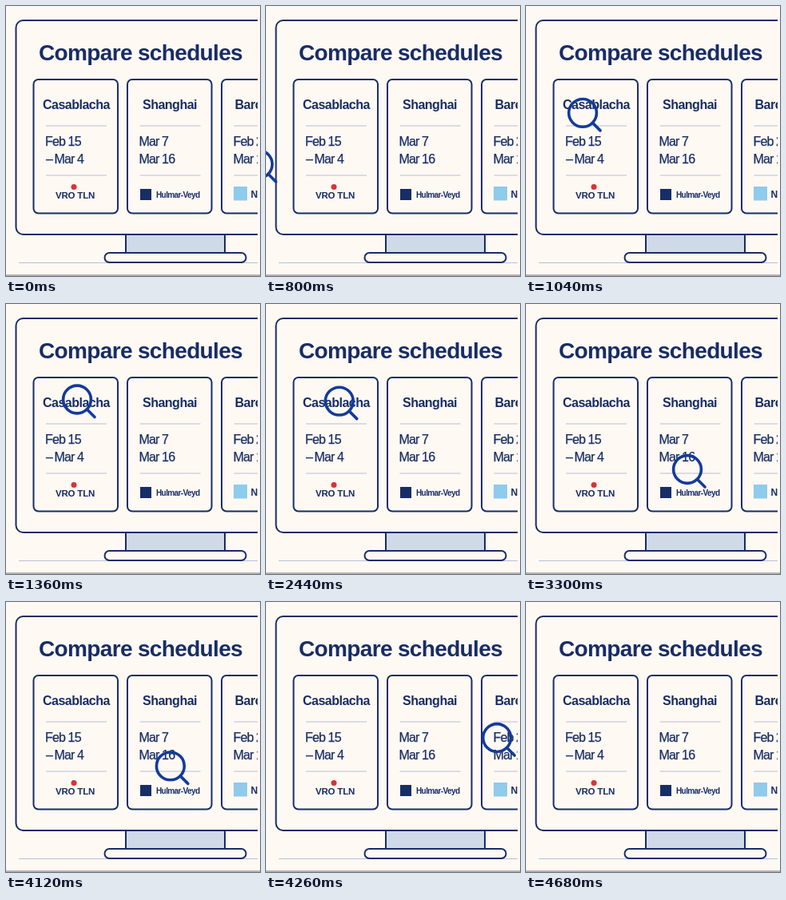
Recreate the animation shown at these times as an HTML page. Size 318x338 px, loop 5450 ms.

```html
<!DOCTYPE html>
<html lang="en">
<head>
<meta charset="utf-8">
<title>Compare schedules</title>
<style>
  html, body { margin: 0; width: 100%; height: 100%; overflow: hidden; background: #fff9f4; }
  svg { display: block; width: 100vw; height: 100vh; }
  text { font-family: "Liberation Sans", Arial, sans-serif; fill: #172d66; }
  .title { font-size: 28px; font-weight: 700; letter-spacing: -.65px; }
  .port { font-size: 16px; font-weight: 700; letter-spacing: -.5px; }
  .date { font-size: 16px; letter-spacing: -.85px; stroke: #172d66; stroke-width: .25px; }
  .brand { font-weight: 700; }
  .line { fill: none; stroke: #172d66; stroke-width: 2; }
  .rule { stroke: #b6c0d4; stroke-width: 1.2; }
</style>
</head>
<body>
<svg viewBox="0 0 318 338" preserveAspectRatio="none">
  <defs>
    <clipPath id="page"><rect width="315" height="338"/></clipPath>
  </defs>
  <rect width="318" height="338" fill="#fff9f4"/>
  <g clip-path="url(#page)">
    <path class="rule" d="M16 321.5H315"/>
    <path class="line" d="M150 286V309H274V286" style="fill:#cfd9e8"/>
    <rect class="line" x="123.5" y="309" width="177" height="12" rx="6" style="fill:#fff9f4"/>
    <rect class="line" x="12.5" y="18" width="330" height="268" rx="9" style="fill:#fff9f4"/>
    <text class="title" x="41" y="67.5">Compare schedules</text>
    <g id="cards"></g>
  </g>
  <path d="M0 337H318" stroke="#a09d9b" stroke-width="1.5"/>
  <g id="lens" fill="none" stroke="#133b9b" stroke-width="3.6" stroke-linecap="round" visibility="hidden">
    <circle r="17.4"/>
    <path d="M12.5 12.5L22 22"/>
  </g>
</svg>
<script>
const LOOP = 5450, STEP = 20, MOVE = 500;
const lens = document.getElementById('lens');

const text = (cls, x, y, str, style = '') =>
  `<text class="${cls}" x="${x}" y="${y}" style="${style}">${str}</text>`;
const rule = (x, y) => `<path class="rule" d="M${x} ${y}h76"/>`;

function card(x, port, portX, from, to, brand) {
  const left = x + 15.5;
  const until = to.startsWith('–')
    ? text('date', left, 196.5, '–') + text('date', left + 10.5, 196.5, to.slice(1))
    : text('date', left - 1, 196.5, to);
  return `<rect class="line" x="${x}" y="92" width="105.5" height="167.5" rx="6"/>` +
    text('port', portX, 129, port) + rule(left, 150) +
    text('date', left - 1, 174.5, from) + until + rule(left, 212) + brand;
}

document.getElementById('cards').innerHTML =
  card(34.5, 'Casablacha', 46, 'Feb 15', '–Mar 4',
    '<circle cx="85" cy="226.5" r="3.5" fill="#d8323a"/>' +
    text('brand', 62, 240.5, 'VRO TLN', 'font-size:11.5px;letter-spacing:-.2px')) +
  card(152, 'Shanghai', 171, 'Mar 7', 'Mar 16',
    '<rect x="168" y="229" width="14" height="14" fill="#172d66"/>' +
    text('brand', 188, 240, 'Hulmar-Veyd', 'font-size:10px;letter-spacing:-.6px')) +
  card(270, 'Barcelona', 286.5, 'Feb 22', 'Mar 17',
    '<rect x="285" y="226" width="17" height="17.5" fill="#8fcbea"/>' +
    text('brand', 306.5, 240, 'Nordane', 'font-size:12px'));

// Moves of the magnifier: start time and end points
const moves = [
  { at: 780, from: [-12, 200], to: [89, 119.5] },
  { at: 2420, from: [89, 119.5], to: [202, 207] },
  { at: 4100, from: [202, 207], to: [360, 140] }
];

// cubic-bezier(.25, .1, .25, 1)
function ease(x) {
  if (x <= 0) return 0;
  if (x >= 1) return 1;
  const curve = (s, a, b) => 3 * (1 - s) ** 2 * s * a + 3 * (1 - s) * s * s * b + s ** 3;
  let lo = 0, hi = 1;
  for (let i = 0; i < 24; i++) {
    const mid = (lo + hi) / 2;
    if (curve(mid, .25, .25) < x) lo = mid; else hi = mid;
  }
  return curve(lo, .1, 1);
}

function draw(time) {
  const t = Math.floor((time % LOOP) / STEP) * STEP;
  const move = moves.filter(m => t > m.at).pop();
  lens.setAttribute('visibility', move ? 'visible' : 'hidden');
  if (!move) return;
  const p = ease((t - move.at) / MOVE);
  const [x, y] = move.from.map((v, i) => v + (move.to[i] - v) * p);
  lens.setAttribute('transform', `translate(${x.toFixed(2)} ${y.toFixed(2)})`);
}

const start = performance.now();
function tick() {
  draw(performance.now() - start);
  requestAnimationFrame(tick);
}
tick();
</script>
</body>
</html>
```
